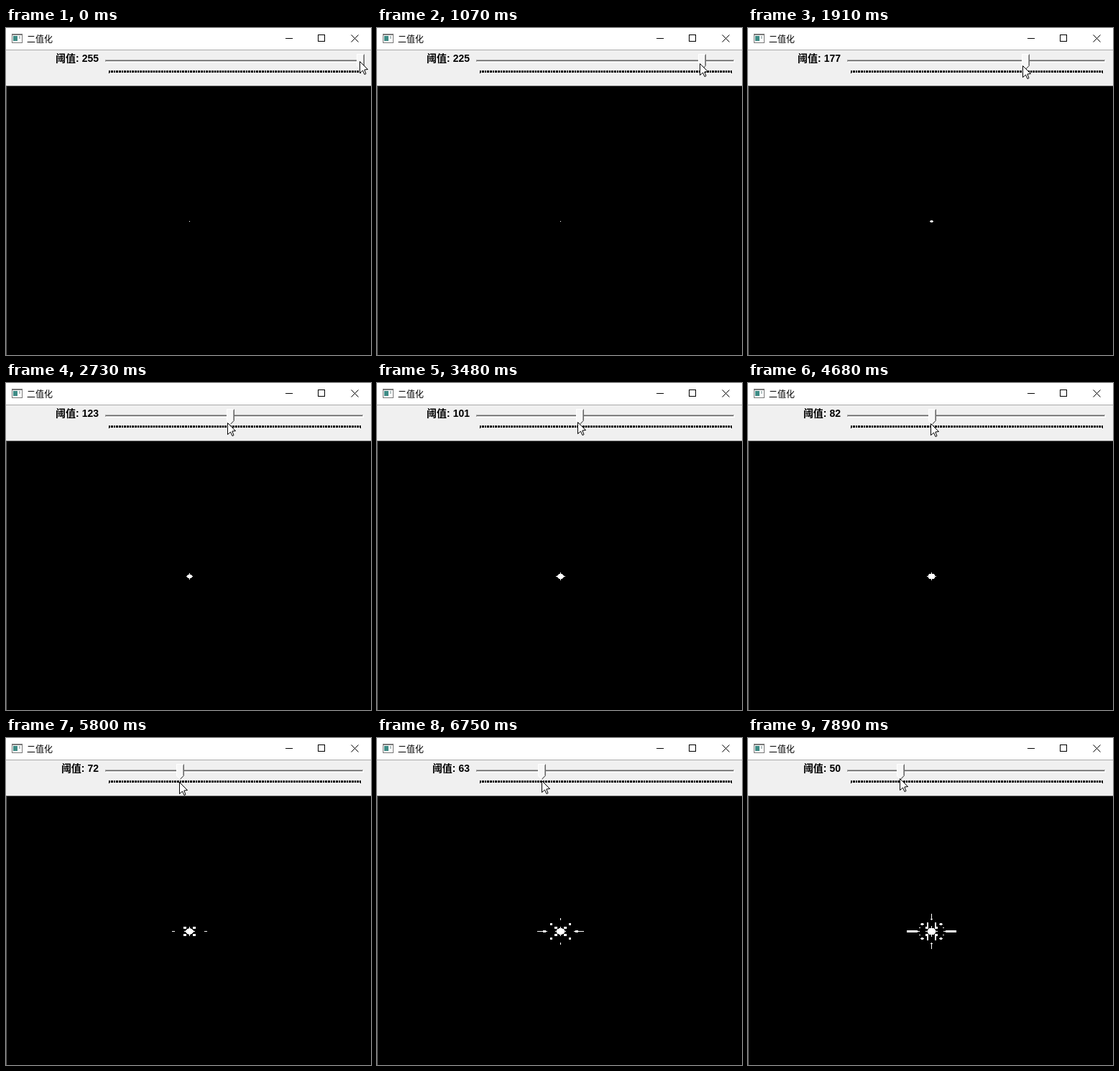
Recreate the animation shown at these times as an HTML page with a canvas. Size 508 px wide and 454 px high, loop 8000 ms.

```html
<!DOCTYPE html>
<html lang="zh-CN">
<head>
<meta charset="utf-8">
<title>二值化</title>
<style>
  html, body { margin: 0; width: 508px; height: 454px; overflow: hidden; background: #000; }
  body { position: relative; }
  canvas { position: absolute; left: 0; top: 0; display: block; }
  span { position: absolute; color: #000; white-space: pre; }
  #title { left: 29px; top: 5px; font: 12px/20px "Noto Sans CJK SC", "Noto Sans CJK", sans-serif; }
  #label { right: 379px; top: 32px; font: bold 14px/20px "Liberation Sans", "Noto Sans CJK SC", "Noto Sans CJK", sans-serif; }
</style>
</head>
<body>
<canvas id="stage" width="508" height="454"></canvas>
<span id="title">二值化</span>
<span id="label">阈值: 255</span>
<script>
const ctx = document.getElementById('stage').getContext('2d');
const label = document.getElementById('label');
const LOOP = 8000;

// Each drag: first step, last step, step count, then threshold and pointer reached
const START = [255, 492, 46];
const DRAGS = [
  [530, 1490, 8, 207, 423, 50],
  [1640, 2610, 8, 127, 313, 55],
  [2730, 3630, 8, 97, 274, 54],
  [3780, 4830, 9, 80, 252, 56],
  [5110, 6060, 8, 69, 237, 62],
  [6470, 6750, 3, 63, 229, 59],
  [7180, 7890, 6, 50, 211, 56]
];

// Side lobes of the spectrum, alike in all quadrants: x, y, peak, half width, half height
const LOBES = [
  [6.5, 5, 82, 1.7, 1.3],
  [22.5, 0, 82, 1.7, 0.95],
  [25.5, 0, 70, 7.2, 0.6],
  [0, 17, 71, 0.85, 1.1],
  [13, 10, 68, 1.8, 1.3],
  [27, 0, 58, 8, 1.6],
  [0, 20, 58, 0.5, 4.5],
  [5.5, 8, 58, 0.8, 4.5],
  [16.5, 5, 57, 1, 1]
];

function poseAt(t) {
  let pose = START;
  for (const [from, to, count, ...goal] of DRAGS) {
    if (t < from) break;
    const gap = (to - from) / (count - 1);
    const step = Math.min(count, Math.floor((t - from) / gap + 0.2) + 1);
    pose = pose.map((p, i) => Math.round(p + (goal[i] - p) * step / count));
  }
  return pose;
}

// Central cone with two narrow spikes, then flat-topped side lobes
function brightness(x, y) {
  const core = 255 - Math.hypot(34 * x, 44 * y);
  const across = y ? 0 : 225 - 20.5 * x;
  const down = x ? 0 : 220 - 23.6 * y;
  const sides = LOBES.map(([cx, cy, peak, w, h]) =>
    peak - 10 * (((x - cx) / w) ** 4 + ((y - cy) / h) ** 4));
  return Math.max(core, across, down, ...sides);
}

const tickX = i => 143 + Math.round(i * 350 / 255);

function box(color, x, y, w, h) {
  ctx.fillStyle = color;
  ctx.fillRect(x, y, w, h);
}

function path(points, x, y) {
  ctx.beginPath();
  points.forEach(([px, py]) => ctx.lineTo(x + px, y + py));
}

function line(color, points, x = 0, y = 0) {
  path(points, x + 0.5, y + 0.5);
  ctx.strokeStyle = color;
  ctx.stroke();
}

function drawTitleBar() {
  box('#fff', 0, 0, 508, 30);
  box('#aaa', 0, 30, 508, 1);
  box('#777', 8, 8, 15, 13);
  box('#fff', 9, 10, 13, 10);
  box('#3f8c86', 10, 11, 6, 7);
  box('#b8c4c4', 18, 11, 2, 4);
  box('#000', 389, 14, 10, 1);
  ctx.strokeStyle = '#000';
  ctx.strokeRect(434.5, 9.5, 9, 9);
  line('#000', [[480, 9], [490, 19]]);
  line('#000', [[490, 9], [480, 19]]);
}

function drawTrack() {
  box('#f0f0f0', 0, 31, 508, 49);
  box('#fff', 138, 44, 360, 4);
  box('#a0a0a0', 138, 44, 359, 3);
  box('#e3e3e3', 139, 45, 358, 2);
  box('#696969', 139, 45, 357, 1);
  for (let i = 0; i < 256; i++) box('#000', tickX(i), 59, 1, i % 255 ? 3 : 4);
}

function drawThumb(value) {
  const x = tickX(value) - 5;
  path([[0, 0], [11, 0], [11, 17], [5.5, 22], [0, 17]], x, 36);
  ctx.fillStyle = '#f7f7f7';
  ctx.fill();
  line('#fff', [[5, 21], [0, 16], [0, 0], [9, 0]], x, 36);
  line('#a0a0a0', [[9, 1], [9, 16], [5, 20]], x, 36);
  line('#696969', [[10, 0], [10, 16], [5, 21]], x, 36);
}

function drawPicture(value) {
  box('#646464', 0, 80, 508, 374);
  box('#000', 1, 81, 507, 373);
  for (let y = 0; y < 26; y++) {
    for (let x = 0; x < 40; x++) {
      if (brightness(x, y) <= value && (x || y)) continue;
      for (const px of [255 - x, 255 + x]) {
        for (const py of [268 - y, 268 + y]) box('#fff', px, py, 1, 1);
      }
    }
  }
}

function drawPointer(x, y) {
  path([[0, 0], [0, 16], [4, 12.5], [6.5, 18], [8.5, 17], [6.3, 11.5], [11, 11]], x + 0.5, y + 0.5);
  ctx.closePath();
  ctx.fillStyle = '#fff';
  ctx.fill();
  ctx.strokeStyle = '#000';
  ctx.stroke();
}

function draw() {
  const [value, x, y] = poseAt(performance.now() % LOOP);
  drawTitleBar();
  drawTrack();
  drawThumb(value);
  drawPicture(value);
  drawPointer(x, y);
  label.textContent = '阈值: ' + value;
  requestAnimationFrame(draw);
}

draw();
</script>
</body>
</html>
```
